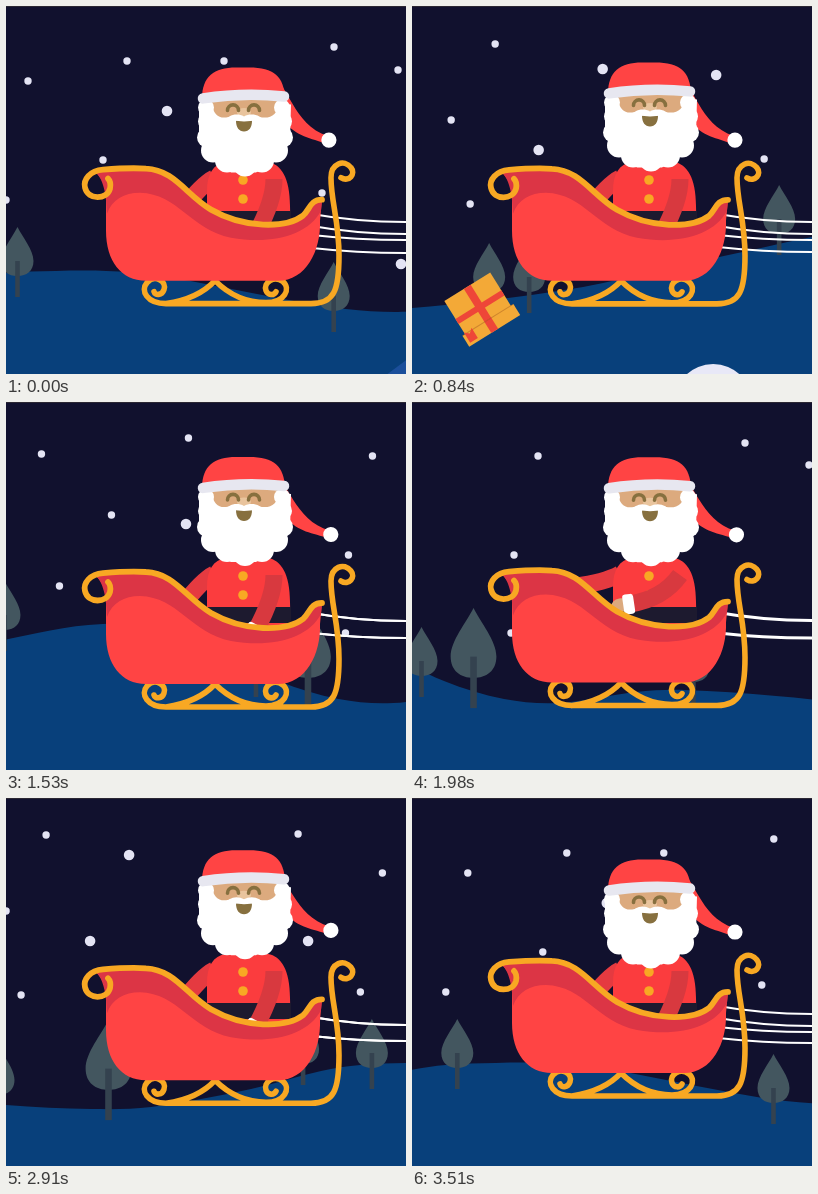
Animation of 400x368 px, one loop 3540 ms. Source, as an HTML page with a canvas:

```html
<!DOCTYPE html>
<html lang="en">
<head>
<meta charset="utf-8">
<title>Sleigh ride</title>
<style>
html, body { margin: 0; width: 100%; height: 100%; overflow: hidden; background: #11112e; }
canvas { display: block; width: 400px; height: 368px; }
</style>
</head>
<body>
<canvas id="stage" width="400" height="368"></canvas>
<script>
const c = document.getElementById('stage').getContext('2d');
const TAU = Math.PI * 2;
const STEP = 30, STEPS = 118;
const SPEED = 16.03, SPAN = 1909.3, CYCLE = 119;

const NIGHT = '#11112e', HILL = '#08407b', STAR = '#e4e4f4', LEAF = '#43565f', TRUNK = '#34424f';
const RED = '#ff4444', COAT = '#fb3c3e', SHADE = '#dc3545', SLEEVE = '#d8393f';
const GOLD = '#f8a823', SKIN = '#dcaa7e', OLIVE = '#87703f', WHITE = '#ffffff';

// x, y of small and big stars along the world strip
const smallStars = [[22,75],[121,55],[218,55],[328,41],[392,64],[97,154],[0,194],[316,187],
  [532,38],[412,144],[680,163],[488,114],[507,198],[801,153],[853,52],[1000,36],[1184,54],
  [923,113],[871,184],[1160,153],[1157,231],[1391,41],[1595,37],[1455,63],[1282,143],
  [1475,143],[1570,197],[1847,36],[1555,113]];
const bigStars = [[161,105],[395,258],[639.5,63],[575.5,144],[753,69],[997.5,122],[1678,57],[1639,143],[1857,143]];

const trees = [[11.5,221],[327.7,256],[526,237],[566,237],[816,179],[1067.5,225],
  [1119.5,206,1.43],[1339.4,231],[1547.4,248],[1657.4,222,1.43],[1852,217]];

const ridge = [[0,267],[50,265],[100,265],[150,269],[288,295],[340,303],[392,306],[449,302],[520,295],
  [620,281],[700,263],[784,245],[849,231],[900,223],[950,223],[1010,240],[1090,279],[1150,297],
  [1205,301],[1282,290],[1330,288],[1422,294],[1555,307],[1640,311],[1700,309],[1800,291],[1870,273]];

const leaf = new Path2D('M0 0C5 10 16 23 16 34C16 44 9 49 0 49C-9 49-16 44-16 34C-16 23-5 10 0 0Z');
const sleighTop = 'M316 194C304 194 304 204 297 210C280 223 238 223 205 204C180 189 168 164 140 163C125 162 110 163 97 164C84 165 77 174 79 182C82 195 101 194 104 183C105 178 104 175 102 173';
const gold = new Path2D(sleighTop);
const hull = new Path2D('M316 194C304 194 304 204 297 210C280 223 238 223 205 204C180 189 168 164 140 163L88 165C96 172 100 180 100 192L100 225C100 255 115 275 140 275L272 275C300 275 315 245 314 215Z');
const hullShade = new Path2D('M316 194C304 194 304 204 297 210C280 223 238 223 205 204C180 189 168 164 140 163L88 165C96 172 100 182 101 208C106 194 118 187 134 187C172 188 185 224 225 232C265 239 302 230 315 205Z');
const runner = new Path2D('M335 172C343 177 350 168 345 162C338 153 325 158 325 172C325 196 333 215 333 250C333 285 328 298 305 298L160 298C141 298 134 285 141 277C149 268 161 276 158 284C156 290 149 290 148 286' +
  'M160 298C180 295 197 288 209 275C222 288 238 297 260 297C279 297 285 283 277 276C268 269 257 277 260 285C262 290 268 290 270 286');
const coat = new Path2D('M201 240L201 185C201 168 207 158 220 156L262 156C275 158 284 172 284 200L285 240Z');
const hat = new Path2D('M196 92C196 70 208 61 230 61L243 61C268 61 278 70 279 92Z');
const tail = new Path2D('M262 66C284 78 286 118 322 130L318 137C302 131 288 130 276 112Z');
const beard = new Path2D('M193 98L206 97C207 108 213 112 220 111L238 108L256 111C266 112 272 107 272 97L285 98L284 135L272 152L250 166L225 166L205 152L193 135Z');
const mustache = new Path2D('M218 116C222 108 231 106 238 110C245 106 255 108 259 116C251 113 246 115 238 115C231 115 226 113 218 116Z');
const curls = [[200,101,8],[201,115,9],[201,131,10],[207,144,12],[221,154,12],[239,158,12],
  [256,154,12],[270,144,12],[277,131,10],[277,115,9],[276,101,8]];

const clamp = v => Math.max(0, Math.min(1, v));
const ease = v => { v = clamp(v); return v * v * (3 - 2 * v); };
const mix = (a, b, p) => a + (b - a) * p;

function fill(path, color) { c.fillStyle = color; c.fill(path); }
function stroke(path, color, w) { c.strokeStyle = color; c.lineWidth = w; c.stroke(path); }
function dot(x, y, r, color) {
  c.fillStyle = color;
  c.beginPath(); c.arc(x, y, r, 0, TAU); c.fill();
}
function rect(x, y, w, h, color) { c.fillStyle = color; c.fillRect(x, y, w, h); }
function at(x, y, angle, draw) {
  c.save(); c.translate(x, y); c.rotate(angle); draw(); c.restore();
}

// Draws every copy of a world item that may be on stage
function place(x, off, reach, draw) {
  for (let s = x - off - SPAN; s < 400 + reach; s += SPAN) if (s > -reach) draw(s);
}

function drawHills(off) {
  const n = ridge.length;
  const p = i => [ridge[(i + n) % n][0] + Math.floor(i / n) * SPAN, ridge[(i + n) % n][1]];
  const slope = i => (p(i + 1)[1] - p(i - 1)[1]) / (p(i + 1)[0] - p(i - 1)[0]);
  c.beginPath();
  c.moveTo(p(-1)[0] - off, 400);
  c.lineTo(p(-1)[0] - off, p(-1)[1]);
  for (let i = 0; i < n + 9; i++) {
    const [ax, ay] = p(i - 1), [bx, by] = p(i), h = (bx - ax) / 3;
    c.bezierCurveTo(ax + h - off, ay + slope(i - 1) * h, bx - h - off, by - slope(i) * h, bx - off, by);
  }
  c.lineTo(p(n + 8)[0] - off, 400);
  c.fillStyle = HILL;
  c.fill();
}

function drawWorld(off) {
  rect(0, 0, 400, 368, NIGHT);
  for (const [x, y] of smallStars) place(x, off, 6, s => dot(s, y, 3.7, STAR));
  for (const [x, y] of bigStars) place(x, off, 6, s => dot(s, y, 5.3, STAR));
  drawHills(off);
  for (const [x, y, k = 1] of trees) place(x, off, 30, s => at(s, y, 0, () => {
    c.scale(k, k);
    fill(leaf, LEAF);
    rect(-2.3, 34, 4.6, 36, TRUNK);
  }));
  place(413.5, off, 60, s => fill(new Path2D(`M${s} 344l48 36h-96z`), '#1b4f9b'));
  place(750, off, 60, s => dot(s, 397, 39, '#e8e8f7'));
}

// Right end heights of the four reins at chosen steps
const reinKeys = [0, 18, 28, 51, 80, 97, 117];
const reins = [
  [216, 217, 216, 219, 217, 227, 216], [228, 227, 228, 219, 219, 227, 228],
  [234, 232, 234, 236, 235, 243, 234], [247, 240, 246, 236, 237, 243, 245]];

function drawReins(n) {
  let i = 0;
  while (i < 5 && n > reinKeys[i + 1]) i++;
  const p = ease((n - reinKeys[i]) / (reinKeys[i + 1] - reinKeys[i]));
  reins.forEach((r, j) => {
    const y = mix(r[i], r[i + 1], p), sag = j < 2 ? 7 : 4;
    stroke(new Path2D(`M306 ${y - sag - 1}Q350 ${y} 402 ${y}`), WHITE, 1.9);
  });
}

function drawArm(from, bend, hand, color) {
  stroke(new Path2D(`M${from}Q${bend} ${hand}`), color, 17);
  at(hand[0], hand[1], Math.atan2(hand[1] - bend[1], hand[0] - bend[0]), () => {
    c.fillStyle = SKIN;
    c.beginPath(); c.ellipse(9, 0, 9, 7, 0, 0, TAU); c.fill();
    c.fillStyle = WHITE;
    c.beginPath(); c.roundRect(-5, -10, 11, 20, 3); c.fill();
  });
}

function drawBody(p) {
  const pose = (a, b) => [mix(a[0], b[0], p), mix(a[1], b[1], p)];
  drawArm([208, 172], pose([196, 178], [188, 184]), pose([176, 204], [146, 158]), '#e53a40');
  fill(coat, COAT);
  rect(201, 205, 84, 16, '#1d1a2f');
  dot(237, 174, 4.8, GOLD);
  dot(237, 193, 4.8, GOLD);
  drawArm([268, 173], pose([268, 195], [228, 200]), pose([250, 228], [174, 168]), SLEEVE);
}

function drawHead(dy, bob) {
  at(280, 80, -bob * 0.0049, () => {
    c.translate(-280, -80);
    fill(tail, RED);
    dot(323, 134, 7.6, WHITE);
  });
  c.save();
  c.translate(0, dy);
  rect(203, 92, 72, 36, SKIN);
  fill(beard, WHITE);
  for (const [x, y, r] of curls) dot(x, y, r, WHITE);
  c.fillStyle = '#e9c49d';
  c.beginPath(); c.ellipse(238, 106, 7, 4.5, 0, 0, TAU); c.fill();
  for (const x of [227, 248]) stroke(new Path2D(`M${x - 5.5} 104a5.5 5.5 0 0 1 11 0`), OLIVE, 3.6);
  fill(new Path2D('M230 114Q238 112 246 114C246 121 243 125 238 125C233 125 230 121 230 114Z'), OLIVE);
  fill(mustache, WHITE);
  fill(hat, RED);
  stroke(new Path2D('M197 92Q237 86 278 90'), '#e7e7f0', 10.5);
  c.restore();
}

function drawSleigh(bob) {
  c.save();
  c.translate(0, bob);
  stroke(runner, GOLD, 5.6);
  fill(hull, RED);
  fill(hullShade, SHADE);
  stroke(gold, GOLD, 5.8);
  c.restore();
}

// t counts steps since the throw began
function drawGift(t, box, ribbon) {
  const top = 14.67, lift = 8.5;
  if (t < lift - 1.5 || t > 33) return;
  const u = t - top;
  const up = clamp((t - lift) / (top - lift));
  const y = u < 0 ? 47 + 2.7 * u * u : 47 + 1.44 * u * u;
  const x = u < 0 ? mix(145, 97, up * (2 - up)) : 97 - 2.1 * u;
  const deg = u < 0 ? 33 * up : 33 + 0.45 * (y - 47);
  at(x, y, deg * TAU / 360, () => {
    rect(-27, -14, 54, 40, box);
    rect(-4, -14, 8, 40, ribbon);
    rect(-27, -1, 54, 6, ribbon);
    rect(-30, -26, 60, 13, box);
    rect(-4, -26, 8, 13, ribbon);
    rect(-30, -13.5, 60, 1, 'rgba(120,50,20,.3)');
    fill(new Path2D('M18-23h9v12l-4.5-4l-4.5 4z'), ribbon);
  });
}

function draw(n) {
  const bob = 6.2 + 6.6 * Math.cos(TAU * 4 * (n - 14.4) / CYCLE);
  const nod = -4.2 + 4.7 * Math.cos(TAU * 3 * (n + 1.2) / CYCLE);
  const throws = [n, n - 60.5];
  const reach = Math.max(...throws.map(t => ease((t - 3) / 5.5) * (1 - ease((t - 20.5) / 5))));
  drawWorld(n * SPEED);
  drawReins(n);
  c.lineCap = 'butt';
  drawBody(reach);
  c.lineCap = 'round';
  drawHead(nod, bob);
  drawGift(throws[0], '#f3a937', '#ee4638');
  drawGift(throws[1], '#fa4343', '#1fb573');
  drawSleigh(bob);
  rect(0, 0, 400, 1, '#2b2733');
}

c.lineCap = c.lineJoin = 'round';
function tick() {
  draw(Math.floor(performance.now() / STEP) % STEPS);
  requestAnimationFrame(tick);
}
tick();
</script>
</body>
</html>
```
